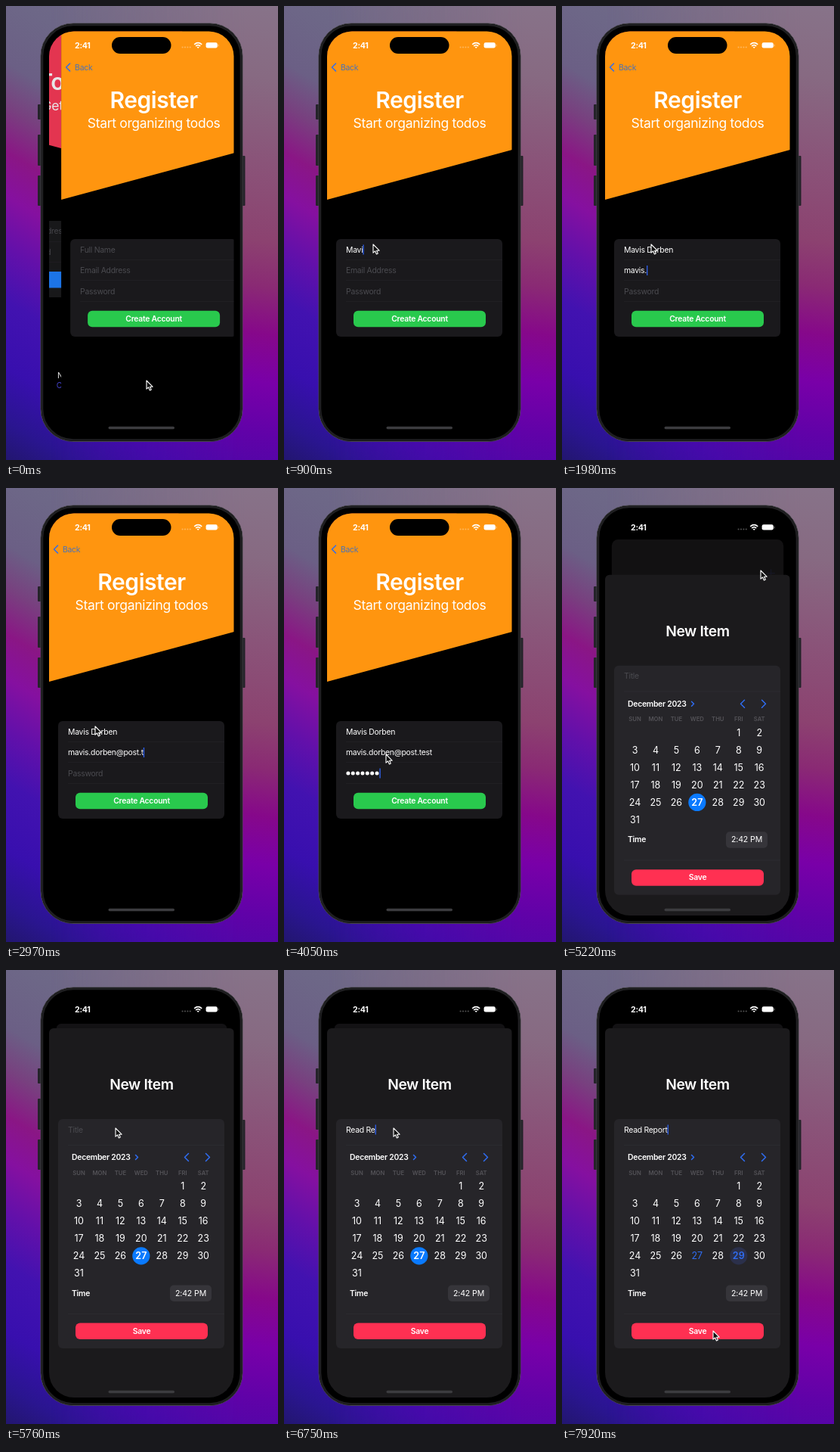
An HTML page that plays this animation: 360 px wide and 600 px high, repeating every 8000 ms.

```html
<!DOCTYPE html>
<html lang="en">
<head>
<meta charset="utf-8">
<title>To do app</title>
<style>
html, body { margin: 0; width: 100%; height: 100%; overflow: hidden; }
body {
  position: relative;
  background: linear-gradient(210deg, #75708a 0, #6d6787 170px, #6b5f85 245px, #78407f 295px,
    #8a1685 347px, #8510a0 398px, #6210aa 457px, #4212b0 518px, #380fae 594px, #2a1590 656px, #22166f 700px) 0 0 / 360px 600px no-repeat;
}
body::before {
  content: ""; position: absolute; left: 0; top: 0; width: 360px; height: 600px;
  background: linear-gradient(188deg, #877389 0, #876a82 95px, #8a5479 205px, #8c4270 310px,
    #8a2a74 370px, #86088a 432px, #7900a8 495px, #6002a8 565px, #4a08a6 640px);
  -webkit-mask-image: linear-gradient(90deg, transparent 60px, #000 315px);
  mask-image: linear-gradient(90deg, transparent 60px, #000 315px);
}
svg { position: absolute; left: 0; top: 0; width: 360px; height: 600px; }
text {
  font-family: Inter, Roboto, "Liberation Sans", sans-serif; fill: #fff;
  dominant-baseline: central; white-space: pre;
}
.line { fill: none; stroke: #2f6cf0; stroke-width: 1.5; stroke-linecap: round; stroke-linejoin: round; }
</style>
</head>
<body>
<svg id="stage" viewBox="0 0 360 600"></svg>
<script>
const LOOP = 8000, MID = 179.5, BLUE = '#0a7aff', TINT = '#2f6cf0', GREY = '#4b4b50';

// Markup helpers; text is placed by the middle of its capitals.
const text = (s, x, y, size = 10.4, o = {}) =>
  `<text x="${x}" y="${y}" font-size="${size}" font-weight="${o.w || 400}"
    text-anchor="${o.a || 'start'}" style="fill:${o.c || '#fff'};letter-spacing:${o.ls ?? -.025}em"
    ${o.id ? `id="${o.id}"` : ''}>${s}</text>`;
const mid = (s, x, y, size, o = {}) => text(s, x, y, size, { ...o, a: 'middle' });
const rect = (x, y, w, h, r, fill, extra = '') =>
  `<rect x="${x}" y="${y}" width="${w}" height="${h}" rx="${r}" fill="${fill}" ${extra}/>`;
const rule = (y, color = '#252428') => rect(82, y, 207, .6, 0, color);
const chevron = (x, y, dir, s = 5) =>
  `<path class="line" d="M${x - dir * s / 2} ${y - s}l${dir * s} ${s}l${-dir * s} ${s}"/>`;
const button = (id, label, y, fill) =>
  `<g id="${id}">${rect(92, y, 175, 21.5, 6, fill)}${mid(label, MID, y + 10.7, 10.4, { w: 600 })}</g>`;

const loginPage = `
  <path d="M57 33H302V231L57 165.5Z" fill="#fb3a58"/>
  ${mid('To Do List', MID, 100, 30, { w: 600, ls: -.02 })}
  ${mid('Get things done', MID, 131, 17.5, { ls: -.018 })}
  ${rect(69, 284, 220, 101, 6, '#1b1a1d')}
  ${text('Email Address', 82, 297.5, 10.4, { c: GREY })}${rule(311)}
  ${text('Password', 82, 325, 10.4, { c: GREY })}${rule(338)}
  ${button('login', 'Log In', 351, '#1f80ff')}
  ${mid('New around here?', MID, 488, 10.4)}
  ${mid('Create An Account', MID, 501, 10.4, { c: '#4a48e0' })}`;

const registerPage = `
  ${rect(57, 33, 245, 533, 0, '#000')}
  <path d="M57 33H302V190L57 256Z" fill="#ff950f"/>
  ${chevron(66, 81, -1)}${text('Back', 75, 81, 10.4, { c: '#4a72b8' })}
  ${mid('Register', MID, 124, 30, { w: 600, ls: -.015 })}
  ${mid('Start organizing todos', MID, 154, 17.5, { ls: -.018 })}
  ${rect(69, 308, 220, 129, 6, '#1a191c')}
  ${text('', 82, 322, 10.4, { id: 'name' })}${rule(335)}
  ${text('', 82, 349.5, 10.4, { id: 'email' })}${rule(362)}
  ${text('', 82, 377, 10.4, { id: 'password' })}<g id="dots" fill="#fff"></g>${rule(390)}
  ${button('create', 'Create Account', 402.7, '#29c94d')}`;

const listPage = `
  <rect id="listBack" x="57" y="33" width="245" height="533"/>
  <g id="listBody">
    <path class="line" d="M278.8 81h10.6M284.1 75.7v10.6" style="stroke:#4460ec;stroke-width:1.3"/>
    ${text('To Do List', 67, 109.5, 20.5, { w: 700, ls: -.035 })}
    <path d="M118 515.8l8.6 7.6-1.2 1.3-.9-.8v7.6h-13v-7.6l-.9.8-1.2-1.3 5-4.4v-2.5h2v.8z" fill="${BLUE}"/>
    <path d="M116.3 531.5v-4.5h3.4v4.5z" fill="#03152e"/>
    ${mid('Home', 118, 538.5, 6.1, { w: 600, c: '#4a52e8', ls: 0 })}
    <circle cx="240" cy="524" r="7.6" fill="#7b7b7f"/>
    <circle cx="240" cy="521.7" r="2.3"/><path d="M235.4 528.4c1-3.6 8.2-3.6 9.2 0q-4.6 3.2-9.2 0z"/>
    ${mid('Profile', 240, 538.5, 6.1, { w: 600, c: '#7b7b7f', ls: 0 })}
  </g>`;

const colX = c => 96.5 + 27.45 * c;
const dayPlace = d => [colX((d + 4) % 7), 285.8 + 23 * Math.floor((d + 4) / 7)];
const days = Array.from({ length: 31 }, (_, i) => {
  const [x, y] = dayPlace(i + 1);
  return mid(i + 1, x, y, 12.5, { id: 'day' + (i + 1), ls: 0 });
}).join('');
const weekdays = ['SUN', 'MON', 'TUE', 'WED', 'THU', 'FRI', 'SAT']
  .map((d, c) => mid(d, colX(c), 268.3, 7.7, { w: 600, c: '#545358', ls: 0 })).join('');

const sheet = `
  ${rect(57, 77, 245, 540, 6, '#1b1a1c')}
  ${mid('New Item', MID, 151, 19.3, { w: 600, ls: -.02 })}
  ${rect(69, 197, 220, 303, 6, '#262529')}
  ${text('', 82, 211, 10.4, { id: 'title' })}${rule(231, '#302f34')}
  ${text('December 2023', 87, 247.5, 10.4, { w: 600 })}
  ${chevron(173, 247.5, 1, 3)}${chevron(239, 247.5, -1)}${chevron(267, 247.5, 1)}
  ${weekdays}<circle id="pick" r="11.6"/>${days}
  ${text('Time', 87, 427.3, 10.4, { w: 600 })}
  ${rect(217, 416.5, 55, 21.5, 5, '#36353a')}${mid('2:42 PM', 244.5, 427.3, 10.6, { ls: -.012 })}
  ${rule(454, '#302f34')}
  ${button('save', 'Save', 466.5, '#ff3052')}`;

const status = `
  ${rect(140, 41, 78.5, 22, 11, '#000')}
  ${text('2:41', 91, 52, 10.6, { w: 700 })}
  <g fill="#fff" opacity=".3">${[0, 1, 2, 3].map(i => `<circle cx="${233.6 + 3.4 * i}" cy="54.5" r="1.1"/>`).join('')}</g>
  <g fill="none" stroke="#fff" stroke-width="1.7">
    <path d="M249.2 50.8q5-4.4 10 0M251.2 53q3-2.6 6 0"/></g>
  <path d="M252.6 54.3q1.6-1.2 3.2 0l-1.6 1.8z" fill="#fff"/>
  ${rect(264.6, 48.2, 15.2, 7.4, 2.3, '#fff')}${rect(280.5, 50.4, 1, 3, .5, '#fff', 'opacity=".5"')}
  ${rect(135.5, 555.8, 87.5, 3.4, 1.7, '#3c3c3f')}`;

const sideButtons = [[42, 130, 20], [42, 170, 41], [42, 224, 40], [312, 198, 66]]
  .map(([x, y, h]) => rect(x, y, 4.5, h, 1, '#242329')).join('');

stage.innerHTML = `
  <clipPath id="screen">${rect(57, 33.5, 244.5, 531.5, 33, '#000')}</clipPath>
  ${sideButtons}
  ${rect(46, 23, 267, 552.5, 43, '#000', 'stroke="#47464a" stroke-width="1"')}
  ${rect(48, 25, 263, 548.5, 41, '#000', 'stroke="#1f1f21" stroke-width="2.6"')}
  <g clip-path="url(#screen)">
    <g id="pages"><g id="loginLayer">${loginPage}</g>
      <rect id="dim" x="57" y="33" width="245" height="533"/>
      <g id="registerLayer">${registerPage}</g></g>
    <g id="listLayer">${listPage}</g>
    <g id="sheetLayer">${sheet}</g>
    <rect id="caret" width="1.3" height="13" fill="#2f62f0"/>
    ${status}
  </g>
  <path id="pointer" d="M0 0V11.2L2.6 8.9 4.4 12.9 6.3 12 4.6 8.2H8.1Z" fill="#111" stroke="#fff" stroke-width="1.1" stroke-linejoin="round"/>`;

const el = id => document.getElementById(id);

// Typed fields: focus time, first key, ms per key, blur time.
const fields = [
  { id: 'name', y: 322, full: 'Mavis Dorben', hint: 'Full Name', focus: 480, start: 560, step: 75, blur: 1500 },
  { id: 'email', y: 349.5, full: 'mavis.dorben@post.test', hint: 'Email Address', focus: 1500, start: 1500, step: 75, blur: 3230 },
  { id: 'password', y: 377, full: '1234567', hint: 'Password', focus: 3230, start: 3300, step: 85, blur: 4500, secret: true },
  { id: 'title', y: 211, full: 'Read Report', hint: 'Title', focus: 5820, start: 6150, step: 82, blur: LOOP }
];

// Pointer waypoints: time, x, y.
const path = [
  [0, 186, 495], [150, 186, 495], [450, 118, 315], [3900, 118, 315], [4050, 135, 352],
  [4360, 181, 407], [4600, 181, 407], [4870, 282, 79], [5020, 282, 79], [5220, 263, 109],
  [5650, 145, 209], [7080, 145, 209], [7370, 231, 376], [7500, 231, 376], [7820, 200, 477], [LOOP, 200, 477]
];
const PUSH = -293, CREATE = 4420, HOME = 4500, SHEET = 4940, PICK = 7430;

const spring = ms => ms <= 0 ? 0 : 1 - (1 + .015 * ms) * Math.exp(-.015 * ms);
const show = (id, on) => { el(id).style.display = on ? '' : 'none'; };
const move = (id, x, y) => el(id).setAttribute('transform', `translate(${x} ${y})`);

function drawPointer(t) {
  const i = Math.max(1, path.findIndex(p => p[0] >= t));
  const [t0, x0, y0] = path[i - 1], [t1, x1, y1] = path[i];
  const u = (t - t0) / (t1 - t0), e = u * u * (3 - 2 * u);
  move('pointer', x0 + (x1 - x0) * e, y0 + (y1 - y0) * e);
}

function drawFields(t) {
  show('caret', false);
  for (const f of fields) {
    const n = Math.max(0, Math.min(f.full.length, Math.floor((t - f.start) / f.step)));
    const node = el(f.id);
    node.textContent = n === 0 ? f.hint : f.secret ? '' : f.full.slice(0, n);
    node.style.fill = n ? '#fff' : GREY;
    let width = n ? 6.35 * n : 0;
    if (f.secret) {
      el('dots').innerHTML = Array.from({ length: n }, (_, i) =>
        `<circle cx="${84.9 + 6.35 * i}" cy="${f.y}" r="2.5"/>`).join('');
    } else if (n) width = node.getComputedTextLength();
    const idle = t - f.start - f.full.length * f.step;
    if (t >= f.focus && t < f.blur && (idle < 0 || idle % 800 < 450)) {
      show('caret', true);
      el('caret').setAttribute('x', 82 + width);
      el('caret').setAttribute('y', f.y - 6.5);
    }
  }
}

function drawCalendar(t) {
  const later = t >= PICK;
  const [x, y] = dayPlace(later ? 29 : 27);
  move('pick', x, y);
  el('pick').style.fill = later ? '#2b304b' : BLUE;
  el('day27').style.fill = later ? TINT : '#fff';
  el('day27').setAttribute('font-weight', later ? 400 : 600);
  el('day29').style.fill = later ? TINT : '#fff';
  el('day29').setAttribute('font-weight', later ? 600 : 400);
}

function draw(t) {
  const push = spring(t - PUSH), rise = spring(t - SHEET);
  show('pages', t < HOME);
  show('listLayer', t >= HOME);
  show('sheetLayer', t >= SHEET);
  move('loginLayer', -73.5 * push, 0);
  move('registerLayer', 245 * (1 - push), 0);
  el('dim').style.opacity = .1 * push;
  el('create').style.opacity = t >= CREATE && t < HOME ? .6 : 1;

  const shade = v => Math.round(v * rise);
  el('listLayer').setAttribute('transform',
    `translate(${MID} ${33 + 38 * rise}) scale(${1 - .078 * rise}) translate(${-MID} -33)`);
  el('listBack').setAttribute('rx', 33 - 26 * rise);
  el('listBack').style.fill = `rgb(${shade(19)},${shade(18)},${shade(20)})`;
  el('listBody').style.opacity = 1 - rise;
  move('sheetLayer', 0, 489 * (1 - rise));

  drawCalendar(t);
  drawFields(t);
  drawPointer(t);
}

const began = performance.now();
function tick() {
  draw((performance.now() - began) % LOOP);
  requestAnimationFrame(tick);
}
draw(0);
tick();
</script>
</body>
</html>
```
